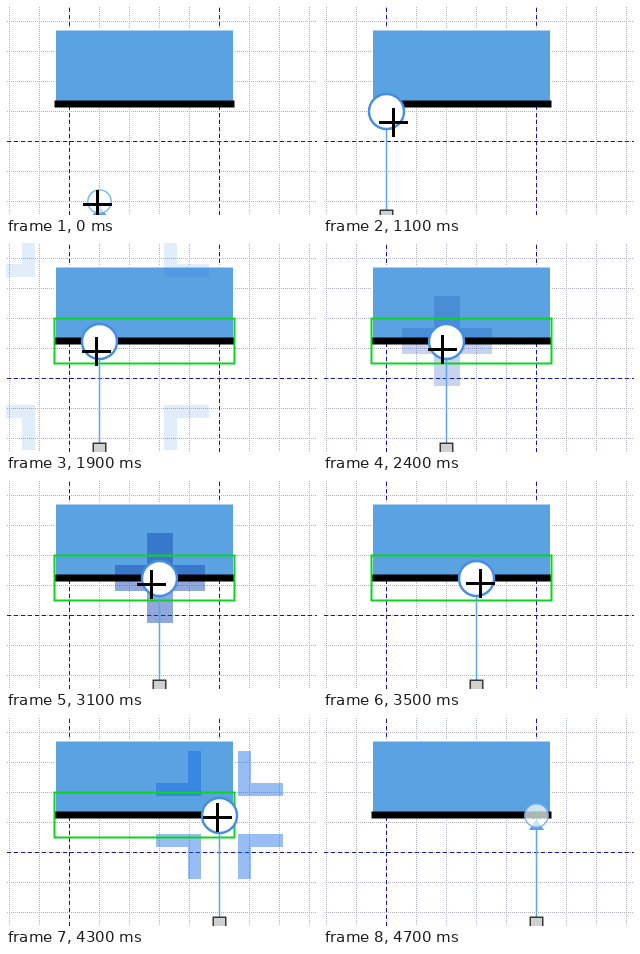
Write an HTML page with a canvas that moves like this. It is 311 px wide and 209 px high and loops after 5200 ms.

```html
<!DOCTYPE html>
<html>
<head>
<meta charset="utf-8">
<style>
html, body { margin: 0; width: 100%; height: 100%; overflow: hidden; background: #fff; }
canvas { display: block; width: 311px; height: 209px; }
</style>
</head>
<body>
<canvas id="stage" width="311" height="209"></canvas>
<script>
const ctx = document.getElementById('stage').getContext('2d');
const W = 311, H = 209, LOOP = 5200, STEP = 100;
const GRAB = 600, DOCK = 1150, DROP = 4400, REST = 4700, BEAM_Y = 98;

// Pointer path: time, x, y
const path = [
  [600, 95, 198], [1100, 70, 116], [1600, 78, 111], [1900, 90, 108],
  [2300, 107, 107], [2400, 119, 106], [3000, 137, 105], [3100, 145, 104],
  [3800, 166, 103], [3900, 184, 102], [4150, 198, 101], [4300, 211, 100], [4700, 213, 100]
];
// Snaps along the beam: time, x
const snaps = [[DOCK, 63], [1603, 93], [2333, 123], [3015, 153], [3843, 183], [4150, 213]];

const lerp = (a, b, k) => a + (b - a) * k;
const snap = (v, origin) => Math.round((v - origin) / 30) * 30 + origin;

function pointer(t) {
  if (t < 100) return [91, 198];
  if (t < GRAB) return [95, 198];
  const i = path.findIndex(p => p[0] > t);
  const a = path[i - 1], b = path[i], k = (t - a[0]) / (b[0] - a[0]);
  return [Math.round(lerp(a[1], b[1], k)), Math.round(lerp(a[2], b[2], k))];
}

function rect(x, y, w, h, color) {
  ctx.fillStyle = color;
  ctx.fillRect(x, y, w, h);
}

function line(x1, y1, x2, y2, color, width = 1, dash = []) {
  ctx.strokeStyle = color;
  ctx.lineWidth = width;
  ctx.setLineDash(dash);
  ctx.beginPath();
  ctx.moveTo(x1, y1);
  ctx.lineTo(x2, y2);
  ctx.stroke();
  ctx.setLineDash([]);
}

function circle(x, y, r, fill, stroke, width) {
  ctx.beginPath();
  ctx.arc(x, y, r, 0, 7);
  ctx.fillStyle = fill;
  ctx.fill();
  ctx.strokeStyle = stroke;
  ctx.lineWidth = width;
  ctx.stroke();
}

function grid() {
  for (let x = 3.5; x < W; x += 30) line(x, 1, x, H, '#b0b0c4', 1, [1, 1]);
  for (let y = 15.5; y < H; y += 30) line(1, y, W, y, '#b0b0c4', 1, [1, 1]);
  for (const x of [63.5, 213.5]) line(x, 2, x, H, '#1616a0', 1, [4, 3]);
  line(1, 135.5, W, 135.5, '#1616a0', 1, [4, 3]);
}

// A plus that fades in, then splits into four corners flying outwards
function burst(x, y, age) {
  if (age <= 50 || age >= 300) return;
  const p = Math.max(0, (age - 90) / 210), gap = 65 * p;
  ctx.globalAlpha = p ? lerp(0.55, 0.11, p) : (age - 50) * 0.0135;
  ctx.fillStyle = p ? '#0a64e6' : '#1446b4';
  for (const sx of [-1, 1]) for (const sy of [-1, 1]) {
    ctx.save();
    ctx.translate(Math.round(x + sx * gap), Math.round(y + sy * gap));
    ctx.scale(sx, sy);
    ctx.fillRect(0, 0, 13, 45);
    ctx.fillRect(13, 0, 32, 13);
    ctx.restore();
  }
  ctx.globalAlpha = 1;
}

function support(x, y, held, radius) {
  const top = y === BEAM_Y ? 200 : y + 99;
  line(x + 0.5, y + 10, x + 0.5, top, '#5fa4e3', 1.5);
  rect(x - 6.5, top - 0.5, 14, 14, '#383838');
  rect(x - 5, top + 1, 11, 11, '#d0d0d0');
  if (held) return circle(x + 0.5, y + 0.5, radius, '#fff', '#468fe0', 2.4);
  ctx.fillStyle = '#5a9fe6';
  ctx.beginPath();
  ctx.moveTo(x + 0.5, y + 4);
  ctx.lineTo(x + 8, y + 15);
  ctx.lineTo(x - 7, y + 15);
  ctx.fill();
  circle(x + 0.5, y + 0.5, 11.7, 'rgba(255,255,255,.7)', '#6cb2ee', 1.3);
}

function cross(x, y) {
  rect(x - 14, y - 1, 29, 3, '#000');
  rect(x - 1, y - 14, 3, 29, '#000');
}

function draw(t) {
  const held = t >= GRAB && t < REST, docked = t >= DOCK;
  const guided = docked && t < DROP;
  const [px, py] = t < REST ? pointer(t) : [0, 0];
  let x = 93, y = 195;
  const last = snaps.filter(s => s[0] <= t).pop();
  if (docked) [x, y] = [last[1], BEAM_Y];
  else if (held) [x, y] = [snap(px, 3), snap(py, 15)];

  rect(0, 0, W, H, '#fff');
  grid();
  rect(49, 23, 179, 72, '#fff');
  rect(50, 24.5, 177, 71, '#5aa2e1');
  if (guided) burst(x + 0.5, BEAM_Y, t - last[0]);
  rect(48.5, 94.5, 180, 7, '#000');
  if (guided) {
    ctx.strokeStyle = '#0bd51c';
    ctx.lineWidth = 2;
    ctx.strokeRect(48.5, 75.5, 180, 45);
  }
  const release = Math.max(0, (t - DROP) / (REST - DROP));
  support(x, y, held, lerp(17.5, 11.7, release));
  if (t >= REST) {
    line(x - 3, y - 4, x + 4, y + 4, '#84d0a8', 1.3);
    line(x + 4, y - 4, x - 3, y + 4, '#84d0a8', 1.3);
  } else if (t < 100 || t >= 300) cross(px, py);
}

function tick() {
  const t = performance.now() % LOOP;
  draw(Math.floor(t / STEP) * STEP);
  requestAnimationFrame(tick);
}
tick();
</script>
</body>
</html>
```
